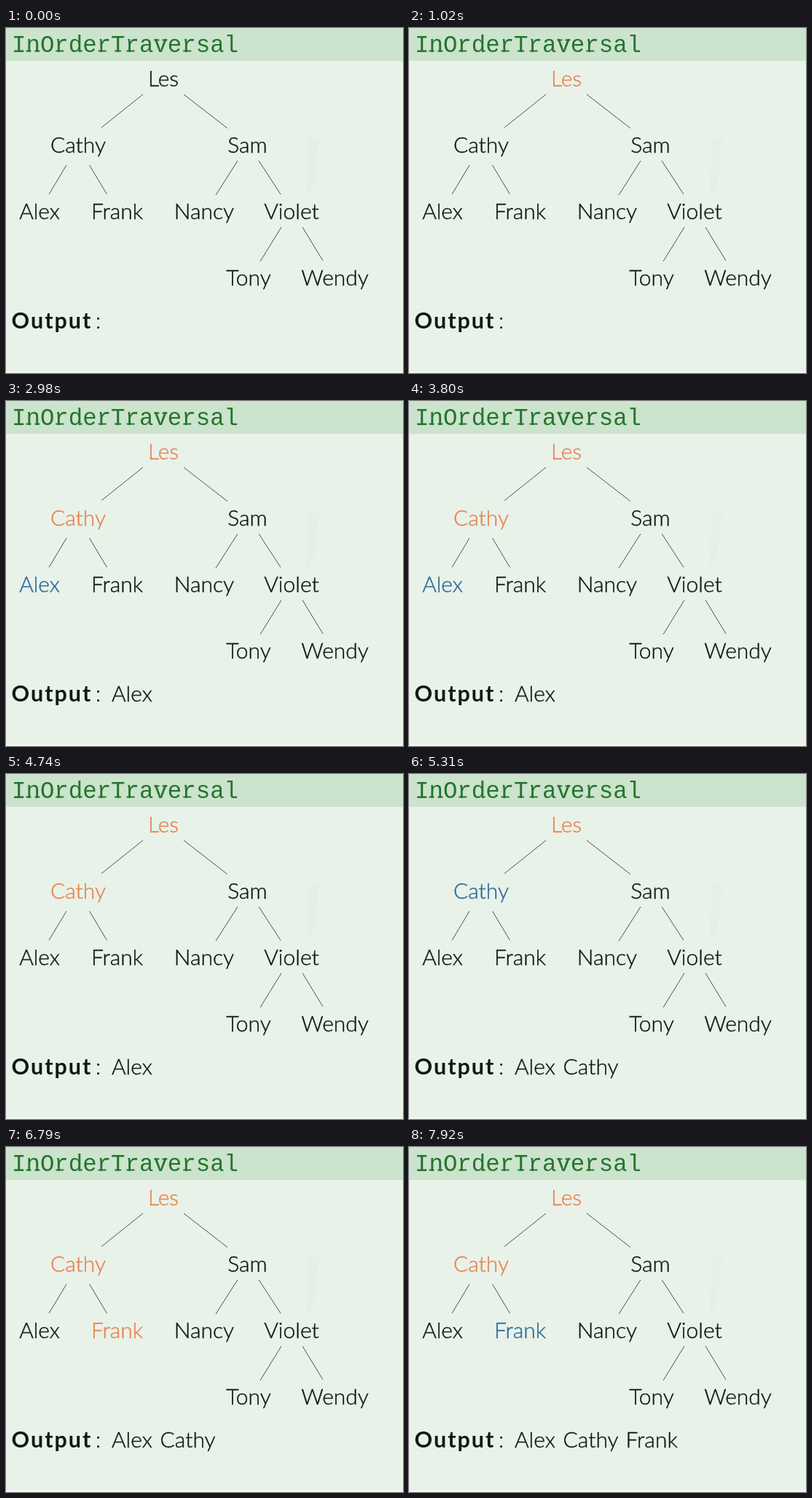
Write an HTML page that moves like this. It is 545 px wide and 473 px high and loops after 8000 ms.

```html
<!DOCTYPE html>
<html lang="en">
<head>
<meta charset="utf-8">
<title>InOrderTraversal</title>
<style>
  html, body { margin: 0; width: 100%; height: 100%; overflow: hidden; background: #e8f2e9; }
  svg { display: block; width: 100%; height: 100%; }
  text { font: 300 30px Lato, sans-serif; fill: currentColor; stroke: currentColor; stroke-width: .4; color: #101a14; }
  .node { text-anchor: middle; }
  .title { font: 32.4px "Liberation Mono", monospace; color: #23762d; stroke: none; }
  .label { font: 700 30.5px Lato, sans-serif; letter-spacing: 2px; stroke: none; }
  .serif { stroke: #23762d; stroke-width: 2; }
  .edges { stroke: #4c544e; stroke-width: 1; }
</style>
</head>
<body>
<svg viewBox="0 0 545 473">
  <rect width="545" height="473" fill="#e8f2e9"/>
  <rect width="545" height="45" fill="#cce3cd"/>
  <rect y="471" width="545" height="2" fill="#f3f8f3"/>
  <path d="M415 151H430L423 216L413 229Z" fill="#e6efe6"/>
  <g id="heading"></g>
  <path class="edges" d="M188 91L131 136.5M244 91L304 137.5M83 188L59 228M114.5 188L138.5 228
    M318 182L288 229M347 182L377 228M378 273L349 320M407 273L435 319"/>
  <g id="tree"></g>
  <text class="label" x="7.5" y="412">Output</text>
  <text x="123" y="412">:</text>
  <g id="output"></g>
</svg>
<script>
const LOOP = 8000;
const BLACK = '#101a14', ORANGE = '#e9804f', BLUE = '#2d6a98';
const TITLE = 'InOrderTraversal', TITLE_X = 8, TITLE_Y = 32.5, PITCH = 19.44;

// Slab strokes that turn the plain monospace letters into a typewriter face
const serifs = {
  n: 'M0 -1h7M12 -1h7',
  r: 'M2 -1h11',
  T: 'M5 -1h9',
  v: 'M1 -16h7M12 -16h7',
  d: 'M15 -1h4'
};

const nodes = {
  Les: [216, 80], Cathy: [99, 171], Sam: [331.5, 171],
  Alex: [46, 262], Frank: [152.5, 262], Nancy: [272, 262], Violet: [392, 262],
  Tony: [333, 353], Wendy: [451.5, 353]
};

// Traversal steps: time, node, its new colour
const steps = [
  [950, 'Les', ORANGE],
  [1700, 'Cathy', ORANGE],
  [2350, 'Alex', ORANGE],
  [2900, 'Alex', BLUE],
  [3900, 'Alex', BLACK],
  [5000, 'Cathy', BLUE],
  [5800, 'Cathy', ORANGE],
  [6600, 'Frank', ORANGE],
  [7450, 'Frank', BLUE]
];

function add(parentId, tag, attributes, content = '') {
  const el = document.createElementNS('http://www.w3.org/2000/svg', tag);
  for (const key in attributes) el.setAttribute(key, attributes[key]);
  el.textContent = content;
  return document.getElementById(parentId).appendChild(el);
}

add('heading', 'text', { x: TITLE_X, y: TITLE_Y, class: 'title' }, TITLE);
[...TITLE].forEach((letter, i) => {
  if (!serifs[letter]) return;
  const transform = `translate(${TITLE_X + i * PITCH} ${TITLE_Y})`;
  add('heading', 'path', { d: serifs[letter], class: 'serif', transform });
});

const labels = {}, printed = {};
for (const [name, [x, y]] of Object.entries(nodes)) {
  labels[name] = add('tree', 'text', { x, y, class: 'node' }, name);
}
for (const [name, x] of [['Alex', 145], ['Cathy', 211.5], ['Frank', 297.5]]) {
  printed[name] = add('output', 'text', { x, y: 412 }, name);
}

function draw(time) {
  const colours = {}, visited = {};
  for (const [start, name, colour] of steps) {
    if (time < start) break;
    colours[name] = colour;
    if (colour === BLUE) visited[name] = true;
  }
  for (const name in labels) labels[name].style.color = colours[name] || BLACK;
  for (const name in printed) printed[name].style.display = visited[name] ? '' : 'none';
}

const origin = performance.now();
function tick() {
  draw((performance.now() - origin) % LOOP);
  requestAnimationFrame(tick);
}
tick();
</script>
</body>
</html>
```
